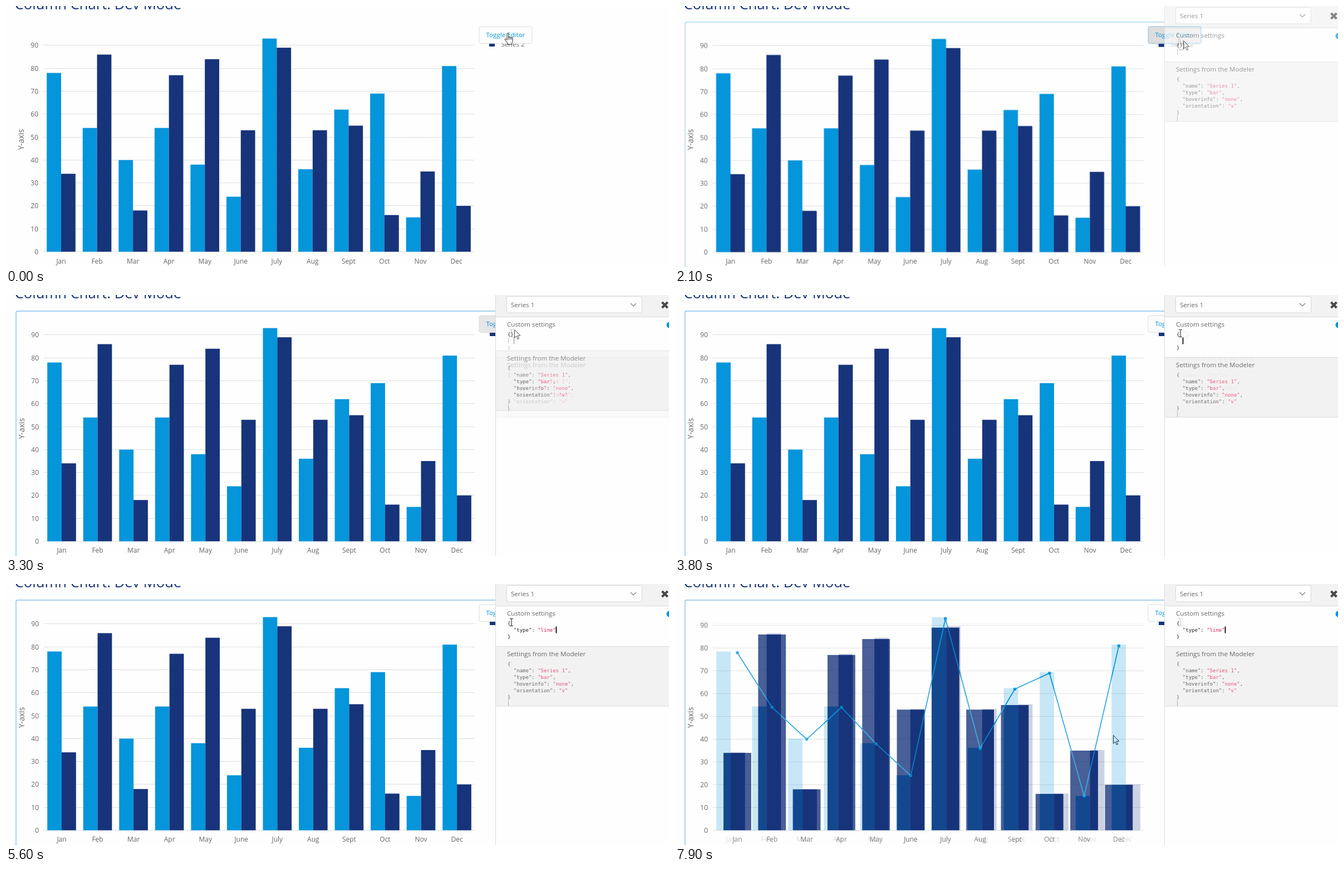
An HTML page that plays this animation: 1191x470 px, repeating every 8000 ms.

```html
<!DOCTYPE html>
<html lang="en">
<head>
<meta charset="utf-8">
<title>Column chart editor</title>
<style>
  html, body { margin: 0; width: 100%; height: 100%; overflow: hidden; background: #fefefe; }
  svg { display: block; width: 100%; height: 100%; }
  text { font: 11.6px "Open Sans", sans-serif; fill: #666; white-space: pre; }
  .title { font-size: 25.6px; fill: #17347b; }
  .label { font-size: 12px; }
  .axis { font-size: 14px; }
  .link { fill: #0595db; }
  .code { font: 9px "DejaVu Sans Mono", monospace; }
  .string { fill: #ea5478; }
  .custom { fill: #222; }
  .custom .string { fill: #de1545; }
</style>
</head>
<body>
<svg id="stage" viewBox="0 0 1191 470"></svg>
<script>
const BLUE = '#0595db', NAVY = '#17347b';
const months = ['Jan', 'Feb', 'Mar', 'Apr', 'May', 'June', 'July', 'Aug', 'Sept', 'Oct', 'Nov', 'Dec'];
const series1 = [78, 54, 40, 54, 38, 24, 93, 36, 62, 69, 15, 81];
const series2 = [34, 86, 18, 77, 84, 53, 89, 53, 55, 16, 35, 20];

const rect = (x, y, w, h, fill, more = '') =>
  `<rect x="${x}" y="${y}" width="${w}" height="${h}" fill="${fill}" ${more}/>`;
const path = (d, stroke, width = 1, fill = 'none', more = '') =>
  `<path d="${d}" stroke="${stroke}" stroke-width="${width}" fill="${fill}" ${more}/>`;
const text = (x, y, content, cls = '', anchor = 'start') =>
  `<text x="${x}" y="${y}" class="${cls}" text-anchor="${anchor}">${content}</text>`;

// Both chart kinds share the frame; only scale and marks differ.
function chart({ left, base, unit, first, pitch, barWidth, line }) {
  const yOf = value => base - value * unit;
  const center = i => first + i * pitch;
  const bar = (x, value, fill) => rect(x, yOf(value), barWidth, value * unit, fill);
  let out = '';
  for (let v = 0; v <= 90; v += 10) {
    const y = Math.round(yOf(v) - .5) + .5;
    out += path(`M${left} ${y}H${left + 774}`, '#dfdfdf') + text(left - 9, y + 4.3, v, 'label', 'end');
  }
  months.forEach((month, i) => {
    const x = center(i);
    out += line ? bar(x - barWidth / 2, series2[i], NAVY)
      : bar(x - barWidth, series1[i], BLUE) + bar(x, series2[i], NAVY);
    out += text(x, 464, month, 'label', 'middle');
  });
  if (line) {
    const points = series1.map((v, i) => [center(i), yOf(v)]);
    out += path('M' + points.join('L'), BLUE, 1.8);
    out += points.map(([x, y]) => `<circle cx="${x}" cy="${y}" r="2.8" fill="${BLUE}"/>`).join('');
  }
  return out + `<g transform="translate(${left - 35} 240.5) rotate(-90)">${text(0, 0, 'Y-axis', 'axis', 'middle')}</g>`;
}

const columns = shift => chart({
  left: 67 + shift, base: 442.5 + shift, unit: 4.128, first: 99 + shift, pitch: 64.55, barWidth: 25.8
});
const combined = () => chart({
  left: 68, base: 443.5, unit: 4.1, first: 112, pitch: 62.3, barWidth: 49.8, line: true
});

const legend = shift =>
  rect(868 + shift, 64 + shift, 10, 9, NAVY) + text(889.5 + shift, 73 + shift, 'Series 2');
const button = (fill, stroke, width = 1) =>
  rect(850, 37, 95, 30.5, fill, `rx="3.5" stroke="${stroke}" stroke-width="${width}"`) +
  text(897.5, 55.7, 'Toggle Editor', 'link', 'middle');

const codeLine = (n, y, content, cls = '') => text(901, y + n * 11.85, content, 'code ' + cls);
const entry = (key, value) => `  "${key}": <tspan class="string">"${value}"</tspan>`;
const codeBlock = (y, lines, cls) => lines.map((l, i) => codeLine(i, y, l, cls)).join('');
const settings = [['name', 'Series 1'], ['type', 'bar'], ['hoverinfo', 'none'], ['orientation', 'v']]
  .map(([k, v], i) => entry(k, v) + (i < 3 ? ',' : ''));

function panel(custom, caretX) {
  const top = 64 + custom.length * 11.85 + (custom.length > 1 ? 11.85 : 23.7) - 11.85;
  const split = Math.round(top) + .5 + 12;
  return rect(880, -1, 320, 480, '#fefefe') +
    rect(880, -1, 320, 40, '#f2f2f2') +
    rect(880, split, 320, 107.5, '#f2f2f2') +
    path(`M879.5 0V470M880 39.5H1191M880 ${split}H1191M880 ${split + 107.5}H1191`, '#dadada') +
    rect(899.5, 2.5, 243, 29.5, '#fefefe', 'rx="3" stroke="#d6d6d6"') +
    text(907, 22, 'Series 1') +
    path('M1122 15l5 5 5-5', '#777', 1.1) +
    path('M1178.5 13l10 10m0-10l-10 10', '#484848', 4) +
    `<circle cx="1192" cy="54" r="5.5" fill="${BLUE}"/>` +
    text(900, 56.5, 'Custom settings') +
    codeBlock(74, custom, 'custom') +
    (caretX ? path(`M${caretX} 76.5V88.5`, '#000', 1.8) : path('M902.5 77V87', '#aaa')) +
    text(900, split + 17.3, 'Settings from the Modeler') +
    codeBlock(split + 34.8, ['{', ...settings, '}']) +
    path(`M902.5 ${split + 97}v10`, '#aaa');
}

const at = (x, y, shape) => `<g transform="translate(${x} ${y})">${shape}</g>`;
const hand = (x, y) => at(x, y, path(
  'M5 13V2a1.4 1.4 0 0 1 2.8 0V8.2a1.3 1.3 0 0 1 2.6.4a1.3 1.3 0 0 1 2.5.6a1.2 1.2 0 0 1 2.3.7V14q0 2-1.5 4v2.5H6.2V18.5L1.6 13q-1.2-2 .4-2.6q1.2-.2 3 2.6M7.8 8V12M10.4 8.8V12M12.9 9.6V12',
  '#222', 1, '#fff', 'stroke-linejoin="round"'));
const arrow = (x, y) => at(x, y, path(
  'M.5 .5V15.2l3.4-3.3 2.4 5.6 2.3-1-2.4-5.4h4.6z', '#111', 1, '#fff'));
const beam = (x, y) => at(x, y, path('M-3 .5h2.5l.5.5.5-.5H3M0 1V13M-3 13.5h2.5l.5-.5.5.5H3', '#222', 1.1));

const plain = (buttonSkin, cursor) => columns(0) + legend(0) + buttonSkin + cursor;
const editing = (plot, buttonSkin, side, cursor) =>
  rect(18, 29, 900, 480, 'none', 'rx="3" stroke="#86c2ea" stroke-width="1.4"') +
  plot + legend(1) + buttonSkin + side + cursor;

const idle = button('#fefefe', '#dcdcdc');
const pressed = button('#dddddd', '#dddddd');
const focused = button('#dddddd', '#6ab6e6', 1.8);
const typed = panel(['{', entry('type', 'line'), '}'], 988.5);

const scenes = [
  plain(idle, hand(895, 48.5)),
  plain(focused, hand(899.5, 58.5)),
  editing(columns(1), pressed, panel(['{}']), arrow(913, 62)),
  editing(columns(1), idle, panel(['{', '', '}'], 912.5), beam(908, 62)),
  editing(columns(1), idle, typed, beam(908, 62)),
  editing(combined(), idle, typed, arrow(787, 272))
];

const stage = document.getElementById('stage');
stage.innerHTML = scenes.map(scene => '<g>' + rect(0, 0, 1191, 470, '#fefefe') +
  text(15.7, 5.5, 'Column Chart: Dev Mode', 'title') + scene + '</g>').join('');
const layers = [...stage.children];

// Each scene fades in over ten steps with a cubic ease-out.
const fadeStarts = [-1000, 500, 1900, 3300, 4700, 7600];
const LOOP = 8000;

function draw(now) {
  const t = now % LOOP;
  const current = fadeStarts.findLastIndex(start => t >= start);
  const step = Math.min(10, Math.floor((t - fadeStarts[current]) / 100) + 1);
  layers.forEach((layer, i) => {
    layer.style.display = i === current || i === current - 1 ? '' : 'none';
    layer.style.opacity = i === current ? 1 - (1 - step / 10) ** 3 : 1;
  });
}

const start = performance.now();
function tick() {
  draw(performance.now() - start);
  requestAnimationFrame(tick);
}
tick();
</script>
</body>
</html>
```
